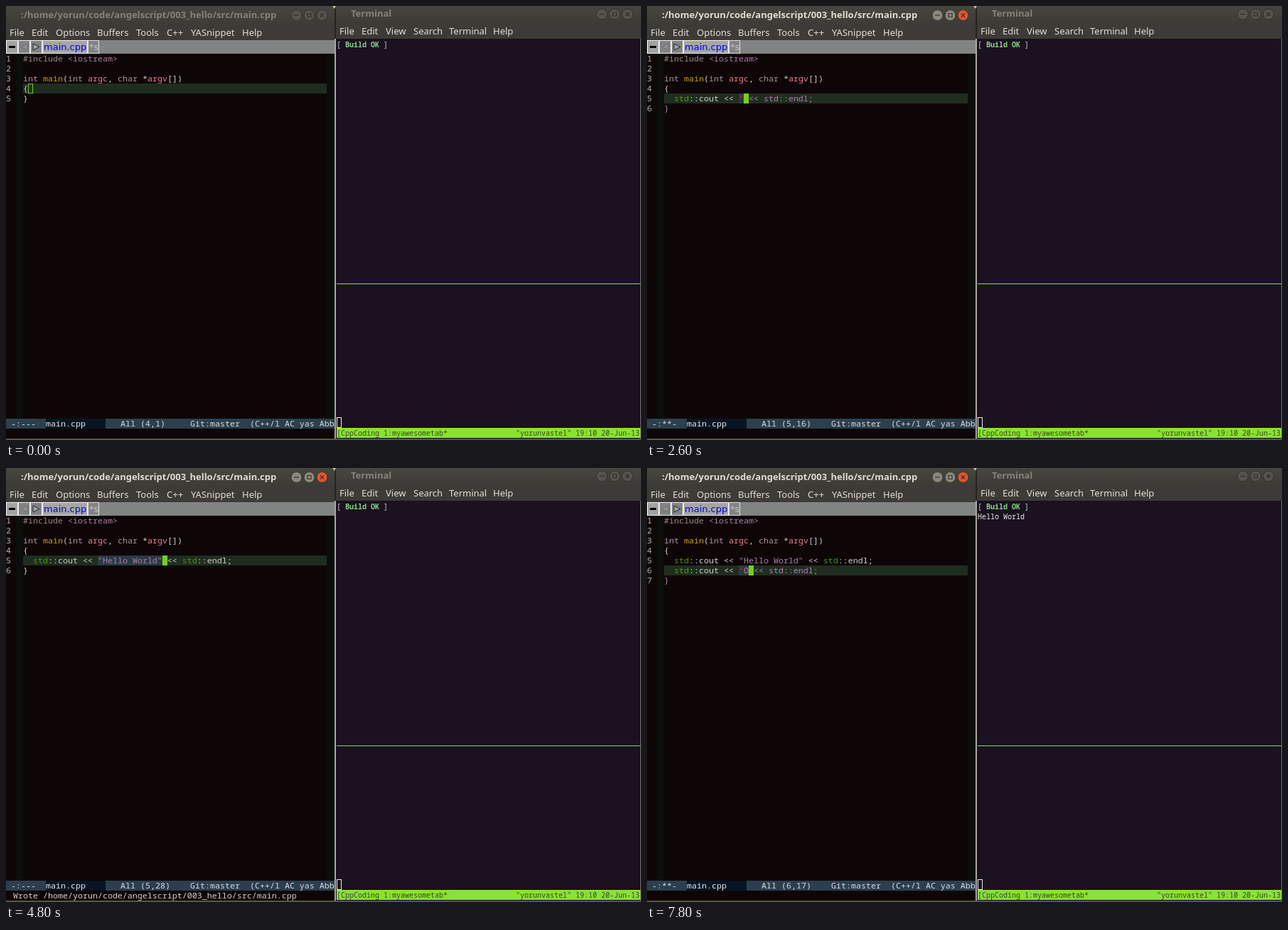
These frames come from a looping animation (893x610 px, 8 s). An HTML page:

```html
<!DOCTYPE html>
<html lang="en">
<head>
<meta charset="utf-8">
<title>Coding session</title>
<style>
  html, body { margin: 0; width: 100%; height: 100%; overflow: hidden; background: #0e0606; }
  svg { display: block; width: 893px; height: 610px; }
  text { white-space: pre; }
  .ui { font: 13px "Noto Sans", sans-serif; }
  .title { font: bold 13px "Noto Sans", sans-serif; }
  .tab { font: 13px "DejaVu Sans", sans-serif; }
  .code { font: 11.667px "Noto Sans Mono", monospace; }
  .term { font: 10px "Noto Sans Mono", monospace; }
  .bold { font-weight: bold; }
</style>
</head>
<body>
<svg viewBox="0 0 893 610">
  <defs>
    <linearGradient id="bar" x2="0" y2="1">
      <stop stop-color="#47463f"/><stop offset="1" stop-color="#3c3b37"/>
    </linearGradient>
  </defs>
  <g id="base"></g>
  <g id="live"></g>
</svg>
<script>
const LOOP = 8000, STEP = 200, CHAR = 7, LINE = 14, LEFT = 24, TOP = 67;
const PATH = '/home/yorun/code/angelscript/003_hello/src/main.cpp';
const C = {
  fg: '#d3cfcc', pre: '#9a8783', str: '#ad7fa8', type: '#ad8fa5', fn: '#c4a012',
  arg: '#ee7f91', ns: '#4e9a06', cursor: '#73d216', warn: '#d8232a',
  green: '#8ae234', field: '#2b3943', current: '#1f2d20'
};

// Typed contents of each new line; '>' marks text inside the expanded snippet's field.
const firstLine = [
  [600, ''], [1000, '  '], [1200, '  c'], [1400, '  cou'], [1600, '  cout'], [2000, '>'],
  [2600, '>"'], [2800, '>"H'], [3000, '>"Hel'], [3200, '>"Hello'], [3400, '>"Hello '],
  [3600, '>"Hello W'], [3800, '>"Hello Wor'], [4000, '>"Hello Worl'], [4200, '>"Hello World"']
];
const secondLine = [
  [5400, '  '], [6600, '  c'], [6800, '  cou'], [7000, '  cout'],
  [7200, '>'], [7600, '>"'], [7800, '>"O']
];

const esc = s => s.replace(/&/g, '&amp;').replace(/</g, '&lt;');
const rect = (x, y, w, h, fill, extra = '') =>
  `<rect x="${x}" y="${y}" width="${w}" height="${h}" fill="${fill}" ${extra}/>`;
const outline = (x, y, w, h, color) =>
  rect(x + .5, y + .5, w - 1, h - 1, 'none', `stroke="${color}"`);
const text = (cls, x, y, fill, s) =>
  `<text class="${cls}" x="${x}" y="${y}" fill="${fill}">${esc(s)}</text>`;
const latest = (list, t) => list.reduce((found, [at, value]) => at <= t ? value : found, null);

// Draws [text, colour] pairs side by side on one editor row.
function codeRow(row, parts) {
  const spans = parts.map(([s, color]) => `<tspan fill="${color}">${esc(s)}</tspan>`).join('');
  return `<text class="code" x="${LEFT}" y="${TOP + (row - 1) * LINE + 11}">${spans}</text>`;
}

function menu(y, items) {
  return items.map(([x, label]) => text('ui', x, y, '#e2ded4', label)).join('');
}

function buttons(x, y, active) {
  return [0, 1, 2].map(i => {
    const cx = x + i * 18;
    const fill = !active ? '#56544d' : i === 2 ? '#e2552f' : '#8b887d';
    const ink = active ? '#37352f' : '#302f2b';
    const mark = [
      'M-3.5 0H3.5',
      'M-2.5-2.5H2.5V2.5H-2.5Z',
      'M-2.5-2.5L2.5 2.5M2.5-2.5L-2.5 2.5'
    ][i];
    return `<g transform="translate(${cx} ${y})" stroke="${ink}">
      <circle r="7.5" fill="${fill}"/><path d="${mark}" fill="none" stroke-width="1.2"/></g>`;
  }).join('');
}

function drawTabs() {
  return rect(0, 48, 462, 19, '#828383') +
    rect(1, 49, 15, 17, '#a3a3a3') + outline(0, 48, 17, 19, '#f0f0f0') +
    rect(4, 56, 9, 3, '#000') + outline(17, 48, 17, 19, '#f0f0f0') +
    outline(34, 48, 17, 19, '#f0f0f0') +
    '<path d="M30 53L21 57.5L30 62Z" fill="#929292" stroke="#6d6d6d"/>' +
    '<path d="M38 53L47 57.5L38 62Z" fill="#a4a4a4" stroke="#222"/>' +
    rect(51, 49, 63, 17, '#a5a5a9') + outline(51, 48, 64, 19, '#f0f0f0') +
    text('tab', 53, 62, '#0000e6', 'main.cpp') +
    outline(115, 48, 16, 19, '#e0e0e0') + text('tab', 117, 62, '#c5c5c5', '*s');
}

function drawBase() {
  const editor = rect(0, 0, 462, 26, 'url(#bar)') + rect(0, 26, 462, 22, '#3c3b37') +
    menu(42, [[5, 'File'], [36, 'Edit'], [70, 'Options'], [128, 'Buffers'], [183, 'Tools'],
      [226, 'C++'], [260, 'YASnippet'], [332, 'Help']]) +
    drawTabs() + rect(0, 67, 462, 541, '#0e0606') +
    rect(14, 67, 10, 513, '#0b0e0b') + rect(451, 67, 11, 513, '#0b0e0b') +
    rect(0, 580, 462, 14, '#2b3f4e') + rect(56, 580, 84, 14, '#071523') +
    text('code', 56, 591, '#e8e8e8', 'main.cpp') +
    text('code', 259, 591, '#dcdcdc', 'Git:master  (C++/l AC yas Abb') +
    codeRow(1, [['#include ', C.pre], ['<iostream>', C.str]]) +
    codeRow(3, [['int ', C.type], ['main', C.fn], ['(', C.fg], ['int ', C.type], ['argc', C.arg],
      [', ', C.fg], ['char ', C.type], ['*', C.fg], ['argv', C.arg], ['[])', C.fg]]);

  const terminal = rect(464, 0, 429, 24, 'url(#bar)') + rect(464, 24, 429, 22, '#3c3b37') +
    text('title', 485, 15, '#85827a', 'Terminal') + buttons(838, 11.5, false) +
    menu(40, [[469, 'File'], [500, 'Edit'], [534, 'View'], [573, 'Search'],
      [623, 'Terminal'], [685, 'Help']]) +
    rect(464, 46, 429, 562, '#1b1120') + rect(465, 390, 427, 1, C.green) +
    outline(465, 578, 7, 15, '#eeeeec') + rect(465, 593, 427, 14, C.green) +
    text('term', 465, 604, '#34491f', '[CppCoding 1:myawesometab*') +
    text('term', 717, 604, '#34491f', '"yorunvastel" 19:10 20-Jun-13') +
    text('term', 465, 58, '#c3d4e3', '[') + text('term', 531, 58, '#c3d4e3', ']') +
    text('term bold', 477, 58, '#87d787', 'Build OK');

  return editor + terminal + rect(462, 0, 2, 46, '#24231f') +
    rect(462, 46, 2, 562, '#aaa8a2') + rect(892, 46, 1, 562, '#77756e') +
    rect(0, 608, 893, 2, '#58564b') + '<path d="M459 0H464L462 4Z" fill="#c9c58f"/>';
}

function statement(row, body, active) {
  if (body[0] !== '>') return codeRow(row, [[body, C.fg]]);
  const quoted = body.slice(1);
  const open = quoted.length > 0 && !/^".*"$/.test(quoted);
  const tail = open
    ? [['"', C.warn], [quoted.slice(1) + ' << std::endl;', C.str]]
    : [[quoted, C.str], [' << ', C.fg], ['std', C.ns], ['::endl;', C.fg]];
  const field = active ? rect(LEFT + 15 * CHAR, TOP + (row - 1) * LINE,
    quoted.length * CHAR, LINE, C.field) : '';
  return field + codeRow(row, [['  ', C.fg], ['std', C.ns], ['::cout << ', C.fg], ...tail]);
}

function drawCursor(row, col, focused) {
  const x = LEFT + col * CHAR, y = TOP + (row - 1) * LINE;
  return focused ? rect(x, y, CHAR, LINE, C.cursor) : outline(x, y, CHAR, LINE, C.cursor);
}

function drawLive(t) {
  const focused = t >= 200;
  const bodies = [latest(firstLine, t), latest(secondLine, t)].filter(b => b !== null);
  const row = 4 + bodies.length, lastRow = row + 1;
  const body = bodies.length ? bodies[bodies.length - 1] : '{';
  const col = body[0] === '>' ? 14 + body.length : body.length;
  const unclosed = /^>"[^"]*$/.test(body);
  const saved = t < 600 || t >= 4800 && t < 5400;
  const cursorOn = t < 5800 || t >= 6200;

  let out = text('title', 21, 17, focused ? '#e0dcd2' : '#85827a', ':' + PATH) +
    buttons(408.5, 13, focused) +
    rect(LEFT, TOP + (row - 1) * LINE, 427, LINE, C.current);
  for (let n = 1; n <= lastRow; n++) {
    out += text('code', 0, TOP + (n - 1) * LINE + 11, '#b5b2b0', String(n));
  }
  out += codeRow(4, [['{', C.fg]]);
  bodies.forEach((b, i) => { out += statement(5 + i, b, 5 + i === row); });
  out += codeRow(lastRow, [['}', unclosed ? C.str : C.fg]]);
  if (cursorOn) out += drawCursor(row, col, focused);

  out += text('code', 7, 591, '#dcdcdc', saved ? '-:---' : '-:**-') +
    text('code', 161, 591, '#dcdcdc', `All (${row},${col})`);
  if (t >= 4800 && t < 5400) out += text('code', 10, 605, C.fg, 'Wrote ' + PATH);
  if (t >= 5400) out += text('term', 465, 72, '#eeeeec', 'Hello World');
  return out;
}

const live = document.getElementById('live');
document.getElementById('base').innerHTML = drawBase();
let shown = -1;

function update(now) {
  const t = Math.floor(now % LOOP / STEP) * STEP;
  if (t !== shown) {
    live.innerHTML = drawLive(t);
    shown = t;
  }
}

const start = performance.now();
function tick() {
  update(performance.now() - start);
  requestAnimationFrame(tick);
}
tick();
</script>
</body>
</html>
```
